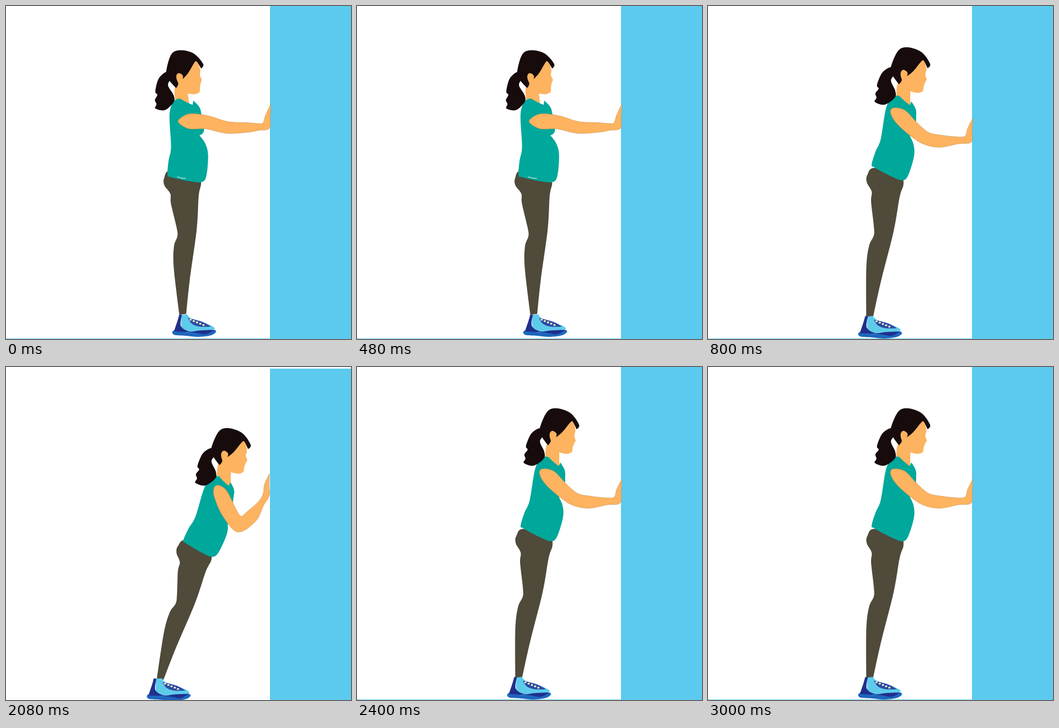
Write an HTML page that moves like this. It is 643 px wide and 621 px high and loops after 3.4 s.

```html
<!DOCTYPE html>
<html lang="en">
<head>
<meta charset="utf-8">
<title>Wall push-up</title>
<style>
html, body { margin: 0; width: 100%; height: 100%; overflow: hidden; background: #fff; }
svg { display: block; width: 100vw; height: 100vh; }
</style>
</head>
<body>
<svg id="stage" viewBox="0 0 643 621" preserveAspectRatio="none"></svg>
<script>
const SKIN = '#fdb35f', HAIR = '#170b0c', SHIRT = '#00a79b', LEGS = '#4f4a39';
const WALL = '#5bcaee', NAVY = '#202f8c', BLUE = '#1d66bd', CYAN = '#5fcbeb';

// Smooth closed outline through points; sharp ones become corners.
function outline(fill, pts, extra = '') {
  const n = pts.length;
  const handle = (i, dir) => {
    const p = pts[i], a = pts[(i + n - 1) % n], b = pts[(i + 1) % n];
    const k = p.sharp ? 0 : dir / 6;
    return `${p.x + (b.x - a.x) * k},${p.y + (b.y - a.y) * k}`;
  };
  let d = `M${pts[0].x},${pts[0].y}`;
  for (let i = 0; i < n; i++) {
    const j = (i + 1) % n;
    d += `C${handle(i, 1)} ${handle(j, -1)} ${pts[j].x},${pts[j].y}`;
  }
  return `<path d="${d}Z" fill="${fill}" ${extra}/>`;
}

// Text form: "x,y" per point, "!" marks a corner.
const blob = (fill, text) => outline(fill, text.trim().split(/\s+/).map(s => {
  const [x, y] = s.replace('!', '').split(',').map(Number);
  return { x, y, sharp: s.endsWith('!') };
}));

// Limb of varying thickness along a spine of [x, y, radius].
function limb(fill, spine, extra) {
  const side = sign => spine.map(([x, y, r], i) => {
    const a = spine[Math.max(0, i - 1)], b = spine[Math.min(spine.length - 1, i + 1)];
    const dx = b[0] - a[0], dy = b[1] - a[1], k = sign * r / Math.hypot(dx, dy);
    return { x: x + dy * k, y: y - dx * k };
  });
  return outline(fill, [...side(1), ...side(-1).reverse()], extra);
}

const group = (transform, body) => `<g transform="${transform}">${body}</g>`;

const face = blob(SKIN, `400,100 407,117 405,128 408,137! 405,142 402,150 400,159 390,162
  377,159! 377,168 377,188! 352,172! 354,144 380,108`);

const hair = blob(HAIR, `414,108 409,116! 402,102 397,104 383,121 371,131! 361,128 361,139
    356,146! 345,131 340,117 354,84 372,77 398,86`)
  + blob(HAIR, `342,114 325,124 315,147 318,154 312,163 314,171 311,179 329,184 348,171
    349,158 341,139 348,126`)
  + blob(SKIN, '359,125 364,119 372,125 367,139 361,136');

const shirt = blob(SHIRT, `345,169 357,168! 365,176 376,185! 379,178! 387,192 388,206
  386,236 376,242! 383,258 384,280 373,316 362,325 340,317 310,301 305,296 312,272
  322,248 332,190`);

const legs = blob(LEGS, `311,302 297,315 296,329 305,346 304,365 309,410 309,428 300,448
  295,490 295,579! 308,579! 322,515 346,420 357,357 364,335 364,323!`);

const lace = i => `<ellipse cx="${344 + i * 6}" cy="${585 + i * 2.5}" rx="2.2" ry="1.7" fill="#fff0bd"/>`;
const shoe = blob(BLUE, '313,605 313,613 335,615 360,617 385,613 388,604 340,603')
  + blob(CYAN, '327,576! 338,575! 346,583 380,595 388,603 360,607 330,606')
  + blob(NAVY, '323,575! 328,576! 326,597 342,607 362,605 388,604! 372,612 350,609 313,607! 320,586')
  + blob('#2a4ba3', '339,582! 366,589 382,598! 362,598 347,593')
  + [0, 1, 2, 3, 4].map(lace).join('');

// Body parts are shared; each pose places them and bends the arm.
const poses = [
  {
    head: 'translate(323 131) rotate(-7.5) scale(.96 1) translate(-365 -125)',
    shirt: 'matrix(1 -.285 .22 1 -69 106.5)',
    legs: 'translate(329 575) rotate(-6.8) scale(1 .97) translate(-301 -579)',
    shoe: '', wallTop: 0, floorY: 620, floorFill: WALL,
    gap: '<path d="M319 318.5Q327 322 335 321.5" stroke="#fff" fill="none"/>',
    arm: [[323, 215, 4], [342, 215, 14], [375, 217, 12.5], [412, 226.5, 11], [450, 226.5, 9],
      [470, 225.5, 6.5], [485, 223, 8], [488, 205, 4.5], [493, 185, .5]]
  },
  {
    head: '', shirt: '', legs: '', shoe: 'translate(-30 3)',
    wallTop: 0, floorY: 620, floorFill: WALL,
    arm: [[343, 194, 5], [358, 205, 14], [380, 227, 13.5], [405, 246, 12], [432, 252, 11.5],
      [466, 250.5, 6.5], [485, 248, 8], [488, 230, 4.5], [493, 211, .5]]
  },
  {
    head: 'translate(42 37)',
    shirt: 'matrix(1 .05 -.12 .95 61 27)',
    legs: 'translate(287 582) rotate(8.6) scale(.97 .95) translate(-301 -579)',
    shoe: 'translate(-47.5 5.5)', wallTop: 3, floorY: 618, floorFill: '#eaf8fd',
    arm: [[392, 223, 5], [400, 237, 13], [416, 271, 14], [435, 293, 15], [457, 279, 12],
      [475, 255, 6], [485, 238, 6], [486, 220, 4.5], [490.5, 201, .5]]
  }
];

const drawPose = p => `<g visibility="hidden">
  <rect x="492" y="${p.wallTop}" width="151" height="621" fill="${WALL}"/>
  <rect y="${p.floorY}" width="492" height="1" fill="${p.floorFill}"/>
  ${group(p.head, face)}
  ${group(p.legs, legs)}
  ${group(p.shoe, shoe)}
  ${group(p.shirt, shirt)}${p.gap || ''}
  ${group(p.head, hair)}
  ${limb(SKIN, p.arm, 'stroke="#b98548" stroke-width=".5"')}
</g>`;

const stage = document.getElementById('stage');
stage.innerHTML = poses.map(drawPose).join('');
const views = [...stage.children];
const order = [0, 1, 2, 1], LOOP = 3400, HOLD = 800;
const start = performance.now();

function tick() {
  const t = (performance.now() - start) % LOOP;
  const current = order[Math.min(3, Math.floor(t / HOLD))];
  views.forEach((v, i) => v.setAttribute('visibility', i === current ? 'visible' : 'hidden'));
  requestAnimationFrame(tick);
}
tick();
</script>
</body>
</html>
```
